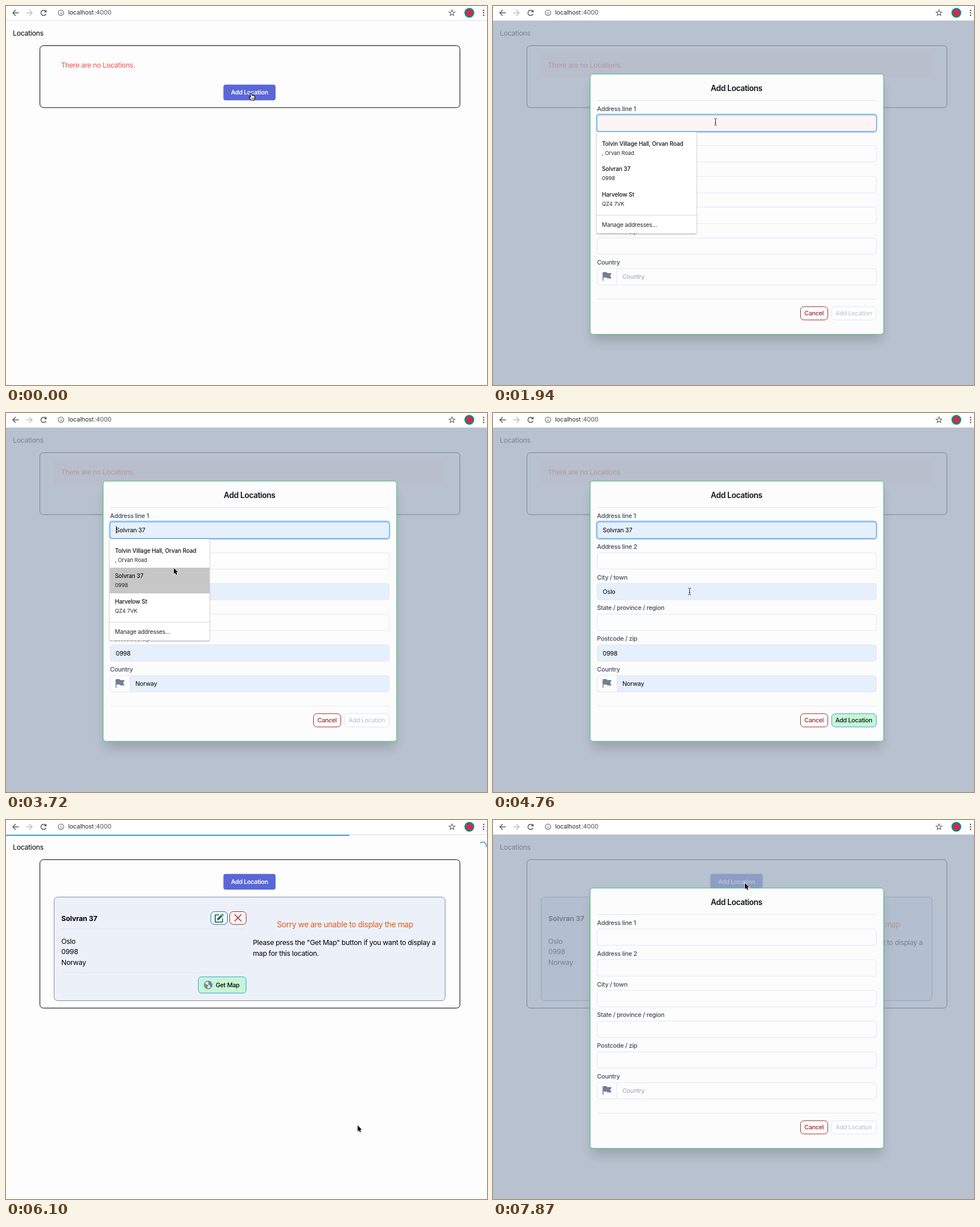
Write an HTML page with a canvas that moves like this. It is 844x664 px and loops after 8 s.

```html
<!DOCTYPE html>
<html lang="en">
<head>
<meta charset="utf-8">
<title>Locations</title>
<style>
  html, body { margin: 0; width: 100%; height: 100%; overflow: hidden; background: #fdfdfd; }
  canvas { display: block; }
</style>
</head>
<body>
<canvas id="stage" width="844" height="664"></canvas>
<script>
const ctx = document.getElementById('stage').getContext('2d');
const LOOP = 8000, TICK = 148.4;
const FONT = 'Inter, "Open Sans", sans-serif';

// Ticks at which the state changes
const OPEN = 1, FOCUS = 10, LIST = 11, HOVER_1 = 19, HOVER_2 = 22, PICK = 29,
      SUBMIT = 39, SAVED = 41, LOADED = 46, PRESS = 52, REOPEN = 53;

const PLACE = 'Solvran 37', CODE = '0998';
const LABELS = ['Address line 1', 'Address line 2', 'City / town',
                'State / province / region', 'Postcode / zip', 'Country'];
const HALL = ['Tolvin Village Hall, Orvan Road', ', Orvan Road', '', '', '', 'United Kingdom'];
const HOME = [PLACE, '', 'Oslo', '', CODE, 'Norway'];
const ITEMS = [[HALL[0], HALL[1]], [PLACE, CODE], ['Harvelow St', 'QZ4 7VK']];

// Cursor keys: tick, x, y
const PATH = [[0, 429.5, 152], [4, 429.5, 152], [10, 390.5, 203], [14, 390.5, 203],
              [21, 299, 265], [23, 294.5, 271.5], [30, 294.5, 271.5],
              [38, 617, 535], [46, 617, 535], [51, 442, 110.5], [54, 442, 110.5]];

const within = (k, a, b) => k >= a && k < b;

// y is the middle of the capital letters
function text(s, x, y, size, color, weight = 400, track = -0.025, align = 'left') {
  ctx.font = `${weight} ${size}px ${FONT}`;
  ctx.letterSpacing = `${(size * track).toFixed(3)}px`;
  ctx.textAlign = align;
  ctx.fillStyle = color;
  ctx.fillText(s, x, y + size * 0.36);
}

function box(x, y, w, h, r, fill, line, width = 1) {
  ctx.beginPath();
  ctx.roundRect(x, y, w, h, r);
  paint(fill, line, width);
}

function paint(fill, line, width = 1) {
  if (fill) { ctx.fillStyle = fill; ctx.fill(); }
  if (line) { ctx.strokeStyle = line; ctx.lineWidth = width; ctx.stroke(); }
}

function poly(points, fill, line, width, close = true) {
  ctx.beginPath();
  points.forEach(([x, y]) => ctx.lineTo(x, y));
  if (close) ctx.closePath();
  paint(fill, line, width);
}

function disc(x, y, r, fill, line, width) {
  ctx.beginPath();
  ctx.arc(x, y, r, 0, 7);
  paint(fill, line, width);
}

function rule(x, y, w, color) {
  ctx.fillStyle = color;
  ctx.fillRect(x, y, w, 1);
}

function at(x, y, draw) {
  ctx.save();
  ctx.translate(x, y);
  draw();
  ctx.restore();
}

function toolbar() {
  ctx.fillStyle = '#fff';
  ctx.fillRect(0, 0, 844, 25);
  rule(0, 25, 844, '#dcdee0');
  const arrow = (x, dir, color) => at(x, 12, () => {
    ctx.scale(dir, 1);
    poly([[-5, 0], [5.5, 0]], null, color, 1.4, false);
    poly([[0, -5], [-5, 0], [0, 5]], null, color, 1.4, false);
  });
  arrow(17, 1, '#4f5256');
  arrow(41, -1, '#b9bbbe');

  ctx.beginPath();
  ctx.arc(66, 12, 4.6, 0.4, 5.5);
  paint(null, '#4f5256', 1.5);
  poly([[71.2, 6.4], [71.2, 11], [66.6, 11]], '#4f5256');

  disc(96.5, 11.8, 4.8, null, '#5f6368', 1.1);
  ctx.fillStyle = '#5f6368';
  ctx.fillRect(96, 11, 1.1, 3.6);
  ctx.fillRect(96, 8.8, 1.1, 1.2);
  text('localhost', 109, 11.6, 10.8, '#25282c', 400, -0.012);
  text(':4000', 155, 11.6, 10.8, '#4c5055', 400, -0.012);

  const star = [];
  for (let i = 0; i < 10; i++) {
    const a = i * Math.PI / 5 - Math.PI / 2, r = i % 2 ? 2.3 : 5.4;
    star.push([782.5 + r * Math.cos(a), 12.2 + r * Math.sin(a)]);
  }
  poly(star, null, '#5f6368', 1.1);
  disc(813, 11.8, 8.6, '#0d8a78');
  disc(813, 11.8, 5.8, '#e0234e');
  for (const y of [7.8, 12, 16.2]) disc(838, y, 1.3, '#55585c');
}

function addButton(y, ring) {
  box(381.5, y, 91.5, 27.5, 4, '#5a67d8');
  if (ring) box(381.5, y, 91.5, 27.5, 4, null, '#63b3ed', 1.6);
  text('Add Location', 427.2, y + 13.8, 10.8, '#fff', 600, -0.03, 'center');
}

function emptyPage(dim) {
  box(59.5, 69.5, 737, 108.5, 6, null, '#000');
  if (dim) box(84, 83, 686, 42, 3, '#fff0f0');
  text('There are no Locations.', 96.5, 104, 12.33, '#f0524f', 400, -0.029);
  addButton(137.7, false);
}

function editIcon() {
  ctx.beginPath();
  ctx.moveTo(374, 166.2);
  ctx.lineTo(367.2, 166.2);
  ctx.lineTo(367.2, 178.8);
  ctx.lineTo(379.8, 178.8);
  ctx.lineTo(379.8, 172.5);
  paint(null, '#22543d', 1.6);
  poly([[370.2, 175.8], [370.9, 172.6], [377.5, 166], [380, 168.5], [373.4, 175.1]], '#276749');
  poly([[378.3, 165.2], [379.6, 164], [382, 166.4], [380.8, 167.7]], '#22543d');
}

function globe() {
  disc(354.7, 289, 6.9, '#d5e8df', '#718096', 1.4);
  poly([[348.5, 286], [352, 288.3], [354.8, 289.6], [353.4, 292], [353.6, 295.4], [349.5, 292.5]], '#718096');
  poly([[353.6, 282.6], [358.2, 283.4], [361, 287.5], [360.4, 292.3], [358.3, 292.2],
        [357.7, 289.6], [354.3, 287.8], [356, 285.4]], '#718096');
}

function savedPage(ring) {
  box(59.5, 69.5, 737, 260, 6, null, '#000');
  addButton(94.5, ring);
  box(84.5, 135, 686, 181.5, 6, '#ecf1f9', '#7c8aa5');
  text(PLACE, 97, 172.2, 12.4, '#000', 700, -0.012);
  rule(97, 190, 324, '#e2e8f0');
  ['Oslo', CODE, 'Norway'].forEach((s, i) =>
    text(s, 97, 212.2 + i * 18.5, 12.33, '#000'));
  rule(97, 267, 324, '#e2e8f0');

  box(359.5, 160.5, 29, 22.5, 6, '#ebf8ff', '#2b6cb0');
  editIcon();
  box(392.5, 160.5, 29, 22.5, 6, '#fdf3f4', '#9b2c2c');
  poly([[401, 165.5], [413, 177.5]], null, '#9b2c2c', 1.5, false);
  poly([[413, 165.5], [401, 177.5]], null, '#9b2c2c', 1.5, false);

  box(337.5, 274.8, 83.8, 28.4, 5, '#c6f6d5', '#4299e1');
  globe();
  text('Get Map', 368, 289, 10.8, '#000', 500);

  text('Sorry we are unable to display the map', 475.3, 182.8, 13.87, '#dd6020', 400, -0.031);
  text('Please press the "Get Map" button if you want to display a', 433.3, 214.8, 12.33, '#000', 400, -0.026);
  text('map for this location.', 433.3, 233.2, 12.33, '#000', 400, -0.026);
}

function progress(k, t) {
  const i = k - SAVED;
  const width = Math.min(1, 0.714 + i * 0.18) * 844;
  ctx.globalAlpha = i < 3 ? 1 : 1 - (i - 2) * 0.35;
  ctx.fillStyle = '#2299dd';
  ctx.fillRect(0, 26, width, 1.7);
  const turn = (t - 6100) / 400 * Math.PI * 2;
  ctx.beginPath();
  ctx.arc(836.5, 44.8, 6.2, turn - 2.1, turn + 0.7);
  paint(null, '#2299dd', 1.5);
  ctx.globalAlpha = 1;
}

const fieldY = i => 191 + i * 53.82;

function modal(k, pointer) {
  ctx.save();
  ctx.shadowColor = 'rgba(0,0,0,.17)';
  ctx.shadowOffsetY = 15;
  ctx.shadowBlur = 19;
  box(174, 123, 508, 448, 5, '#fdfdfd');
  ctx.restore();
  box(170.5, 119.2, 515, 456, 5, '#fdfcfd', '#48bb78');
  text('Add Locations', 427.3, 143.6, 13.87, '#10151f', 600, -0.032, 'center');
  rule(183, 165, 490, '#e2e8f0');

  const focused = within(k, FOCUS, SUBMIT);
  const values = within(k, HOVER_1, HOVER_2) ? HALL : within(k, HOVER_2, SAVED) ? HOME : [];
  LABELS.forEach((label, i) => {
    const y = fieldY(i), value = values[i], last = i === 5, active = focused && i === 0;
    text(label, 182.6, y - 11, 10.8, '#3f4a5c', 500, -0.021);
    if (active) box(181.7, y - 1.2, 491.4, 31, 4.5, null, 'rgba(66,153,225,.5)', 2.4);
    const fill = value ? '#e6f0fd' : active ? '#fff4f3' : '#fdfdfe';
    box(182.8, y, 489.8, 28.5, 4, fill, active ? '#63b3ed' : '#e0e6ef');
    if (last) {
      box(183.3, y + 0.5, 34.2, 27.5, [4, 0, 0, 4], '#fdfdfe');
      ctx.fillStyle = '#e0e6ef';
      ctx.fillRect(217, y, 1, 28.5);
      flag(y + 6);
    }
    const x = last ? 227 : 192.6;
    if (value) text(value, x, y + 14.4, 10.8, '#000');
    else if (last) text('Country', x, y + 14.4, 10.8, '#98a4b6');
    if (active) caret(k, value, x, y);
  });

  rule(183, 513, 490, '#e2e8f0');
  box(539.5, 526.8, 48, 23.2, 6, '#fefefe', '#9b2c2c');
  text('Cancel', 563.3, 538.6, 10.8, '#9b2c2c', 500, -0.03, 'center');
  const ready = within(k, PICK, SAVED), pressed = within(k, SUBMIT, SAVED);
  const hot = ready && pointer === 'hand';
  const fill = !ready ? '#fefefe' : hot ? '#9ae6b4' : '#c6f6d5';
  if (pressed) box(594, 526.8, 78.8, 23.2, 3, null, 'rgba(66,153,225,.5)', 2.6);
  box(594.2, 526.8, 78.5, 23.2, pressed ? 3 : 6, fill, ready ? '#4299e1' : '#d3e6f4');
  text('Add Location', 633, 538.6, 10.8, ready ? '#0b1a12' : '#b4bfcb', ready ? 500 : 400, -0.028, 'center');

  if (within(k, LIST, PICK)) suggestions(k);
}

function caret(k, value, x, y) {
  const picked = k >= PICK;
  const shown = picked ? (k - PICK) % 6 < 3
    : within(k, FOCUS, 13) || within(k, 17, 20) || within(k, 25, PICK);
  if (!shown) return;
  const left = picked ? x + ctx.measureText(value).width + 1 : 193;
  ctx.fillStyle = '#000';
  ctx.fillRect(Math.round(left), y + 7, 1, 13);
}

function flag(y) {
  at(192.3, y, () => {
    ctx.beginPath();
    ctx.moveTo(0, 0.6);
    ctx.bezierCurveTo(3, -0.5, 5, 0, 7.6, 0.5);
    ctx.lineTo(8.4, 2);
    ctx.lineTo(15.8, 2);
    ctx.lineTo(13.4, 6.6);
    ctx.lineTo(15.8, 11.2);
    ctx.lineTo(8.2, 11.2);
    ctx.lineTo(7.4, 9.6);
    ctx.lineTo(1.5, 9.6);
    ctx.lineTo(1.5, 15.4);
    ctx.lineTo(0, 15.4);
    ctx.closePath();
    paint('#718096');
  });
}

function suggestions(k) {
  ctx.save();
  ctx.shadowColor = 'rgba(0,0,0,.35)';
  ctx.shadowBlur = 3;
  ctx.shadowOffsetY = 1;
  box(182, 221, 175, 177.5, [0, 0, 2, 2], '#fff');
  ctx.restore();
  const hover = within(k, HOVER_1, HOVER_2) ? 0 : k >= HOVER_2 ? 1 : -1;
  ITEMS.forEach(([title, sub], i) => {
    const y = 226.6 + i * 44.6;
    if (i === hover) {
      ctx.fillStyle = '#c6c6c6';
      ctx.fillRect(182, Math.round(y), 175, 45);
    }
    text(title, 191.2, y + 14.5, 10, '#111', 500, -0.012);
    text(sub, 191.2, y + 30.7, 9.25, '#222', 400, 0);
  });
  rule(182, 366, 175, '#d6d8db');
  text('Manage addresses...', 191.2, 383.3, 10, '#222', 400, -0.01);
}

function pointerPos(k) {
  const n = PATH.findIndex((p, i) => i && k <= p[0]);
  const [k0, x0, y0] = PATH[n - 1], [k1, x1, y1] = PATH[n];
  const u = (k - k0) / (k1 - k0), e = u * u * (3 - 2 * u);
  return [x0 + (x1 - x0) * e, y0 + (y1 - y0) * e];
}

function pointerKind(k, x, y, open) {
  const over = (l, t, r, b) => x > l && x < r && y > t && y < b;
  if (!open) {
    const top = k < OPEN ? 138 : 94;
    return over(381, top, 473, top + 28) ? 'hand' : 'arrow';
  }
  if (within(k, PICK, 31)) return 'arrow';
  if (within(k, LIST, PICK) && over(182, 221, 357, 399)) return 'arrow';
  if (k >= PICK && over(594, 526, 673, 550)) return 'hand';
  return LABELS.some((_, i) => over(183, fieldY(i), 673, fieldY(i) + 28.5)) ? 'beam' : 'arrow';
}

const cursors = {
  arrow() {
    poly([[0, 0], [0, 10.6], [2.4, 8.4], [4, 12], [5.8, 11.2], [4.2, 7.7], [7.4, 7.5]], '#000', '#fff', 1.6);
    poly([[0, 0], [0, 10.6], [2.4, 8.4], [4, 12], [5.8, 11.2], [4.2, 7.7], [7.4, 7.5]], '#000');
  },
  hand() {
    ctx.beginPath();
    ctx.moveTo(-1.1, 1.4);
    ctx.quadraticCurveTo(0, -0.4, 1.2, 1.2);
    ctx.lineTo(1.8, 4.4);
    ctx.quadraticCurveTo(3, 3.6, 3.8, 4.9);
    ctx.quadraticCurveTo(5, 4.2, 5.6, 5.6);
    ctx.quadraticCurveTo(7.4, 5.2, 7.3, 7.6);
    ctx.lineTo(6.2, 13);
    ctx.lineTo(0.6, 13);
    ctx.lineTo(-2.8, 8.6);
    ctx.quadraticCurveTo(-3, 6.6, -0.2, 7.8);
    ctx.closePath();
    ctx.lineJoin = 'round';
    paint('#fff', '#000', 1.1);
    for (const x of [1.9, 3.6, 5.2]) poly([[x, 8.4], [x, 11.2]], null, '#000', 0.7, false);
  },
  beam() {
    const bar = [[0, -5], [0, 5]];
    poly(bar, null, '#333', 1.1, false);
    for (const s of [-1, 1]) {
      poly([[-2.4, 6 * s], [-1, 5.8 * s], [0, 4.8 * s], [1, 5.8 * s], [2.4, 6 * s]], null, '#333', 1, false);
    }
    poly([[-1.3, 2], [1.3, 2]], null, '#333', 0.8, false);
  }
};

function render(t) {
  const k = Math.floor(t / TICK);
  const open = within(k, OPEN, SAVED) || k >= REOPEN;
  const [x, y] = pointerPos(k);
  const kind = pointerKind(k, x, y, open);

  ctx.fillStyle = '#fdfdfd';
  ctx.fillRect(0, 0, 844, 664);
  text('Locations', 12, 47.8, 12.33, '#000', 400, -0.027);
  if (k < SAVED) emptyPage(open);
  else savedPage(k >= PRESS);
  if (open) {
    ctx.fillStyle = 'rgba(160,174,192,.75)';
    ctx.fillRect(0, 26, 844, 638);
    modal(k, kind);
  }
  toolbar();
  if (within(k, SAVED, LOADED)) progress(k, k * TICK);
  at(x, y, cursors[kind]);
}

let start;
function loop(now) {
  start ??= now;
  render((now - start) % LOOP);
  requestAnimationFrame(loop);
}
requestAnimationFrame(loop);
</script>
</body>
</html>
```
